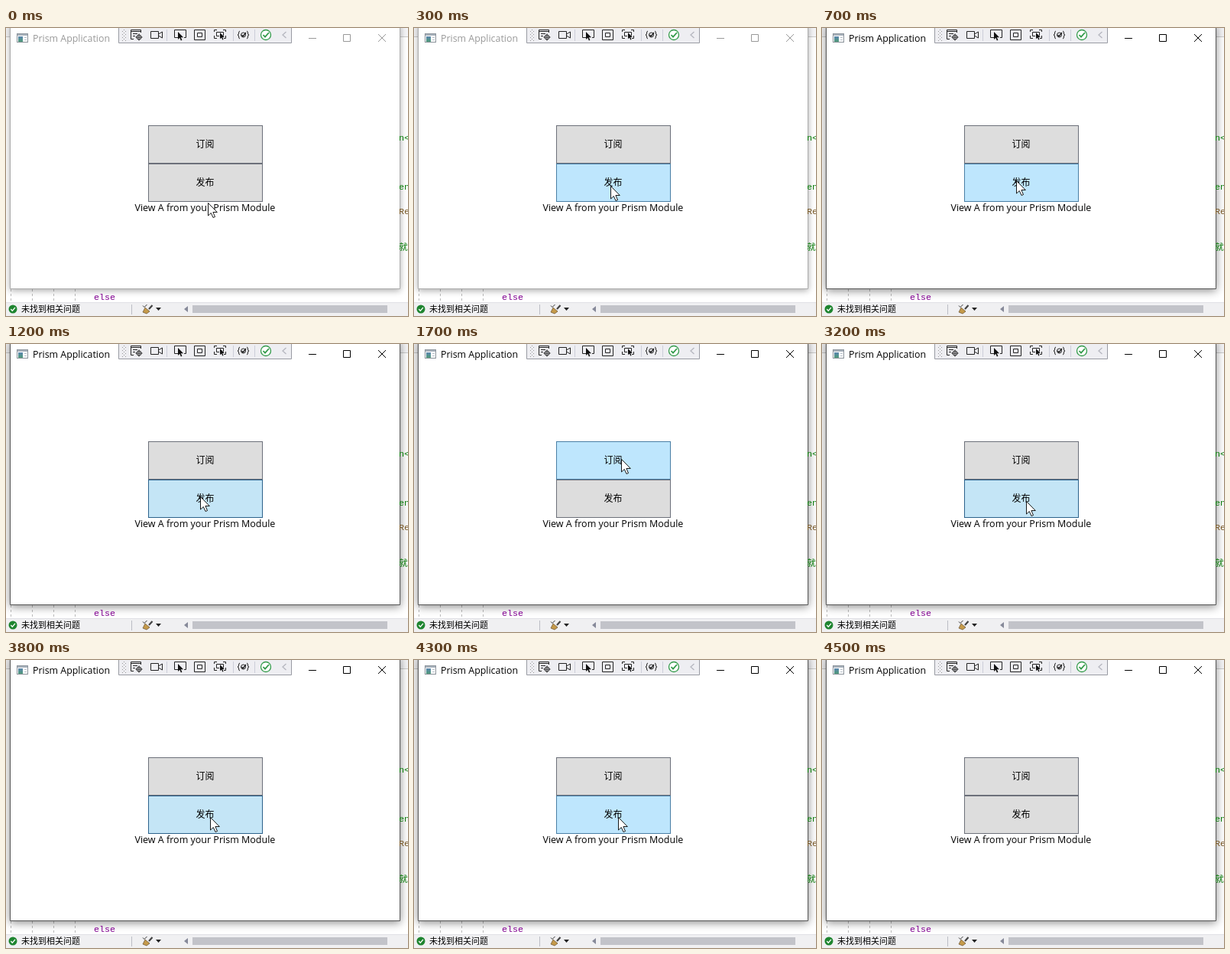
Write an HTML page that moves like this. It is 526x376 px and loops after 5500 ms.

```html
<!DOCTYPE html>
<html lang="zh">
<head>
<meta charset="utf-8">
<style>
  html, body { margin: 0; width: 100%; height: 100%; overflow: hidden; background: #fff; }
  svg { display: block; }
  text { font: 12.4px "Open Sans", "Noto Sans CJK SC", "Noto Sans CJK", sans-serif; }
  .code text { font: 11.7px "Liberation Mono", "Noto Sans CJK SC", "Noto Sans CJK", monospace; }
  .line { fill: none; stroke: #222; }
  #frame { fill: #fff; stroke: #555; filter: drop-shadow(0 2px 6px #0007); }
  #title { fill: #000; }
  #caption { stroke: #000; fill: none; }
  .inactive #frame { stroke: #aaa; filter: drop-shadow(0 2px 4px #0005); }
  .inactive #title { fill: #999; }
  .inactive #caption { stroke: #999; }
  .button rect { fill: #ddd; stroke: #6c707a; }
  .button text { font-size: 12px; text-anchor: middle; }
  .hover rect { fill: #bee6fd; stroke: #4a7fa5; }
  .pressed rect { fill: #c4e5f6; stroke: #2c628b; }
</style>
</head>
<body>
<svg id="stage" width="526" height="376" viewBox="0 0 526 376">
  <defs>
    <pattern id="dots" width="4" height="4" patternUnits="userSpaceOnUse">
      <path d="M0 0h1v1h-1zM2 2h1v1h-1z" fill="#999"/>
    </pattern>
    <linearGradient id="pane" x2="0" y2="1">
      <stop stop-color="#5b86b0"/>
      <stop offset="1" stop-color="#4f9a78"/>
    </linearGradient>
    <path id="arrow" d="M0 0V16.5L3.8 13L6.5 19L9 18L6.4 12H11.8Z"/>
  </defs>

  <!-- editor behind the window -->
  <rect width="526" height="11" fill="#f5f5f7"/>
  <path d="M0 11.5H526" stroke="#ccc"/>
  <path d="M6.5 341V358M34.5 341V358M62.5 341V358M90.5 341V358" stroke="#bbb" stroke-dasharray="3 3"/>

  <!-- application window -->
  <path id="frame" d="M5.5 -5H515.5V340.5H5.5Z"/>
  <g class="code">
    <text x="115" y="355" fill="#800090">else</text>
    <text x="514" y="147" fill="#007800">n&lt;</text>
    <text x="514" y="211" fill="#007800">en</text>
    <text x="514" y="243" fill="#74531f">Re</text>
    <text x="514" y="290" fill="#007800">就</text>
  </g>
  <path d="M514.5 20V340" stroke="#fff"/>
  <g>
    <rect x="14.5" y="7.5" width="14" height="11" fill="#fff" stroke="#8a929a"/>
    <path d="M15 9H28" stroke="#a9b3bd" stroke-width="2"/>
    <rect x="16" y="11" width="6" height="7" fill="url(#pane)"/>
    <path d="M24 12.5H27M24 15.5H27" stroke="#b5bec8"/>
  </g>
  <text id="title" x="35" y="18">Prism Application</text>
  <path id="caption" d="M396 13.5H406M441.5 8.5h9v9h-9zM487 8l10 10M497 8l-10 10"/>

  <!-- debugging toolbar -->
  <path d="M147.5 -1V19.5H373.5V-1" fill="#eeeef2" stroke="#999ba3"/>
  <rect x="151" y="1" width="6" height="16" fill="url(#dots)"/>
  <path d="M210.5 2V17M297.5 2V17M325.5 2V17" stroke="#ccced8"/>
  <g class="line">
    <path d="M167 14.5H163.5V2.5H176.5V6M163 4.5H177M166 7.5H172M166 10.5H169"/>
    <circle cx="174" cy="12" r="3"/>
    <path d="M174 7.5V16.5M169.5 12H178.5"/>
    <path d="M189.5 4.5H199.5V13.5H189.5ZM199.5 8L204.5 5V13L199.5 10Z"/>
    <path d="M225 12.5H220.5V2.5H235.5V12.5H233"/>
    <path d="M246.5 2.5H260.5V15.5H246.5ZM250.5 6.5H256.5V11.5H250.5Z"/>
    <path d="M272.5 5V2.5H276M284 2.5H287.5V5M272.5 10V13.5H276M287.5 10V13.5H285M279 10.5H275.5V5.5H284.5V10"/>
    <path d="M306 4Q304.5 4 304.5 7Q304.5 9 303 9Q304.5 9 304.5 11Q304.5 14 306 14M315 4Q316.5 4 316.5 7Q316.5 9 318 9Q316.5 9 316.5 11Q316.5 14 315 14"/>
    <circle cx="310.5" cy="9" r="3"/>
    <path d="M308.5 9L310 11L314 6" stroke-width="1.4"/>
  </g>
  <use href="#arrow" transform="translate(225 5) scale(.6)" fill="#111"/>
  <use href="#arrow" transform="translate(280 6) scale(.5)" fill="#111"/>
  <circle cx="340" cy="9" r="6.5" fill="#fff" stroke="#339b4a" stroke-width="1.3"/>
  <path d="M336.5 9L339 11.7L344 6" fill="none" stroke="#339b4a" stroke-width="1.8"/>
  <path d="M366.5 5L362 9L366.5 13" fill="none" stroke="#b5b6bf" stroke-width="1.3"/>

  <!-- content -->
  <g class="button">
    <rect x="186.5" y="127.5" width="149" height="49"/>
    <text x="260.5" y="156">订阅</text>
  </g>
  <g class="button">
    <rect x="186.5" y="177.5" width="149" height="49"/>
    <text x="260.5" y="206">发布</text>
  </g>
  <text x="168.5" y="239" style="font-size:12.5px">View A from your Prism Module</text>

  <!-- status bar -->
  <rect y="358" width="526" height="18" fill="#f0f0f2"/>
  <path d="M0 358.5H526" stroke="#e0e0e5"/>
  <circle cx="9" cy="367" r="5.5" fill="#1e8530"/>
  <path d="M6.3 367L8.3 369.2L12 364.8" fill="none" stroke="#fff" stroke-width="1.3"/>
  <text x="20" y="371" style="font-size:11px">未找到相关问题</text>
  <path d="M164.5 361V374" stroke="#bbbcc4"/>
  <path d="M187 367L191.5 362" stroke="#444" stroke-width="2.2"/>
  <path d="M182 365L188 370L184 373L179 371Z" fill="#c59a4a" stroke="#665030" stroke-width=".7"/>
  <path d="M179 362.5L181 364.5L184.5 361" fill="none" stroke="#333"/>
  <path d="M196 365H203L199.5 369Z" fill="#222"/>
  <path d="M238 363V371L233 367Z" fill="#868999"/>
  <rect x="244" y="362" width="255" height="10" fill="#c2c3c9"/>

  <use id="cursor" href="#arrow" fill="#fff" stroke="#000" stroke-width=".9"/>
</svg>
<script>
  const LOOP = 5500, STEP = 100;
  // time, x, y of the pointer tip
  const path = [
    [0, 264, 228], [400, 254, 199], [1200, 254, 199], [1700, 271, 150], [2300, 271, 150],
    [2500, 270, 183], [2900, 267, 205], [4300, 267, 205], [4400, 355, 218]
  ];
  const stage = document.getElementById('stage');
  const cursor = document.getElementById('cursor');
  const buttons = document.querySelectorAll('.button');
  const between = (v, low, high) => v >= low && v <= high;

  function pointerAt(t) {
    const next = path.findIndex(key => key[0] >= t);
    if (next < 0) return path.at(-1).slice(1);
    if (next === 0) return path[0].slice(1);
    const [t0, x0, y0] = path[next - 1], [t1, x1, y1] = path[next];
    const k = (t - t0) / (t1 - t0);
    return [x0 + (x1 - x0) * k, y0 + (y1 - y0) * k];
  }

  function isPressed(t) {
    const rapidClicks = between(t, 600, 1200) || between(t, 3200, 4200);
    return (rapidClicks && t % 200 === 0) || between(t, 1900, 2000);
  }

  function draw() {
    const t = Math.floor(performance.now() % LOOP / STEP) * STEP;
    const [x, y] = pointerAt(t).map(Math.round);
    cursor.setAttribute('transform', `translate(${x + .5} ${y + .5})`);
    cursor.style.display = t < 4500 ? '' : 'none';
    stage.classList.toggle('inactive', t < 600);

    // hover feedback trails the pointer by one step
    const [hx, hy] = pointerAt(t - STEP);
    buttons.forEach((button, i) => {
      const top = 127 + 50 * i;
      const hover = between(hx, 186, 336) && hy >= top && hy < top + 50;
      button.classList.toggle('hover', hover);
      button.classList.toggle('pressed', hover && isPressed(t));
    });
    requestAnimationFrame(draw);
  }
  draw();
</script>
</body>
</html>
```
